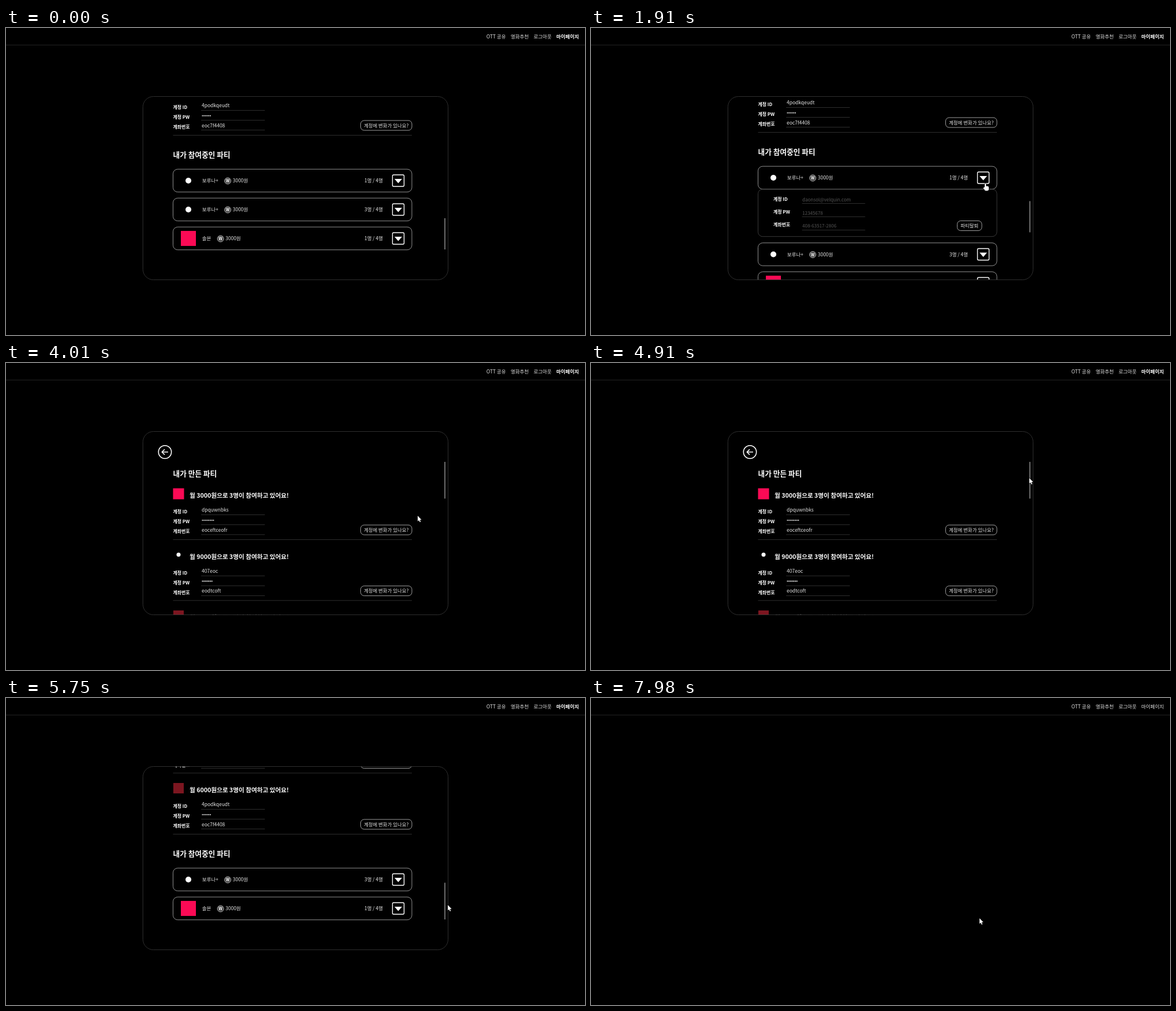
These frames come from a looping animation (1000 px wide and 531 px high, 8 s). An HTML page with a canvas:

```html
<!DOCTYPE html>
<html lang="ko">
<head>
<meta charset="utf-8">
<title>마이페이지</title>
<style>
html, body { margin: 0; width: 100%; height: 100%; overflow: hidden; background: #000; }
canvas { display: block; width: 1000px; height: 531px; }
</style>
</head>
<body>
<canvas id="stage" width="1000" height="531"></canvas>
<script>
const ctx = document.getElementById('stage').getContext('2d');
const FONT = '"Noto Sans CJK KR", "Noto Sans CJK", "Noto Sans", sans-serif';
const WHITE = '#fff', LIGHT = '#e4e4e4', RED = '#fa0a55';
const BODY = 8.45, LABEL = 7.9, TITLE = 10.6, HEADING = 12.65;
const LEFT = 288.5, WIDTH = 412.5, RIGHT = LEFT + WIDTH;
const ROW = 50, ROW_HEIGHT = 39.5, PANEL = 82.5;

const LOOP = 8000;
const OPEN_FIRST = 1860, LEAVE_FIRST = 3290, RELOAD = 3430;
const OPEN_SECOND = 6510, LEAVE_SECOND = 7790;
const DRAG_START = 5010, DRAG_END = 5750, DRAG_RANGE = 281;

const mora = { name: '보루나+', color: WHITE, size: 10, round: true };
const solv = { name: '솔븐', color: RED, size: 26 };
const hosted = [
  { color: RED, size: 19, price: 3000, id: 'dpquwnbks', dots: 8, account: 'eoceftceofr' },
  { color: WHITE, size: 7, round: true, price: 9000, id: '407eoc', dots: 7, account: 'eodtcoft' },
  { color: '#7c1620', size: 18, price: 6000, id: '4podkqeudt', dots: 6, account: 'eoc7f4408' }
];
const joined = [
  { service: mora, members: 1 },
  { service: mora, members: 3 },
  { service: solv, members: 1 }
];

// Where the pointer heads, one stop after another.
const stops = [
  { start: 940, end: 1640, x: 681, y: 269, button: true },
  { start: 1990, end: 2620, x: 655, y: 344, button: true },
  { start: RELOAD, end: 4520, x: 757, y: 199 },
  { start: 5910, end: 6240, x: 679, y: 361, button: true },
  { start: 7150, end: 7370, x: 662, y: 363, button: true },
  { start: LEAVE_SECOND, end: 7980, x: 671, y: 381 }
];

const progress = (t, a, b) => Math.min(1, Math.max(0, (t - a) / (b - a)));
const smooth = p => p * p * (3 - 2 * p);

function dragOffset(t) {
  return DRAG_RANGE * (1 - (1 - progress(t, DRAG_START, DRAG_END)) ** 1.77);
}

function scrollAt(t) {
  if (t < RELOAD) return t < OPEN_FIRST ? 331 : 336;
  return dragOffset(t) + PANEL * smooth(progress(t, 6830, 7150));
}

function pointerAt(t) {
  let x = 745, y = 350;
  for (const stop of stops) {
    if (t < stop.start) break;
    const p = smooth(progress(t, stop.start, stop.end));
    if (stop.start > DRAG_END && stop === stops[3]) { x += 6; y += 159; }
    x += (stop.x - x) * p;
    y += (stop.y - y) * p;
  }
  const drag = t < stops[3].start ? dragOffset(t) / DRAG_RANGE : 0;
  return { x: x + 6 * drag, y: y + 159 * drag };
}

function text(str, x, midY, { size = BODY, bold = false, color = LIGHT, align = 'left' } = {}) {
  ctx.font = `${bold ? 700 : 400} ${size}px ${FONT}`;
  ctx.fillStyle = color;
  ctx.textAlign = align;
  ctx.fillText(str, x, midY + size * 0.37);
}

const strong = (str, x, y, size) => text(str, x, y, { size, bold: true, color: WHITE });

function box(x, y, w, h, r, color, width = 0.8) {
  ctx.beginPath();
  ctx.roundRect(x, y, w, h, r);
  ctx.strokeStyle = color;
  ctx.lineWidth = width;
  ctx.stroke();
}

function rule(x, y, w, color = '#4c4c4c') {
  ctx.fillStyle = color;
  ctx.fillRect(x, y - 0.3, w, 0.6);
}

function disc(x, y, r, color) {
  ctx.beginPath();
  ctx.arc(x, y, r, 0, Math.PI * 2);
  ctx.fillStyle = color;
  ctx.fill();
}

function badge({ color, size, round }, x, y) {
  if (round) return disc(x, y, size / 2, color);
  ctx.fillStyle = color;
  ctx.fillRect(x - size / 2, y - size / 2, size, size);
}

function pill(label, right, y, w) {
  box(right - w, y - 8.5, w, 17, 6, '#c4c4c4');
  text(label, right - w / 2, y, { align: 'center' });
}

function drawNav(active) {
  rule(0, 29.5, 1000, '#3a3a3a');
  let x = 989.4;
  ['마이페이지', '로그아웃', '영화추천', 'OTT 공유'].forEach((label, i) => {
    const bold = active && i === 0;
    text(label, x, 15, { bold, color: bold ? WHITE : LIGHT, align: 'right' });
    x -= ctx.measureText(label).width + 8.4;
  });
}

function drawBackButton(x, y) {
  ctx.beginPath();
  ctx.arc(x, y, 11.2, 0, Math.PI * 2);
  ctx.moveTo(x + 5.5, y);
  ctx.lineTo(x - 5, y);
  ctx.moveTo(x - 0.5, y - 4.6);
  ctx.lineTo(x - 5.2, y);
  ctx.lineTo(x - 0.5, y + 4.6);
  ctx.strokeStyle = WHITE;
  ctx.lineWidth = 1.5;
  ctx.stroke();
}

function drawHosted(party, y) {
  badge(party, 298, y - 3);
  strong(`월 ${party.price}원으로 3명이 참여하고 있어요!`, 317, y, TITLE);
  ['계정 ID', '계정 PW', '계좌번호'].forEach((label, i) => {
    strong(label, LEFT, y + 28 + i * 17, LABEL);
    rule(337, y + 33.5 + i * 17.1, 110);
  });
  text(party.id, 338, y + 25);
  for (let i = 0; i < party.dots; i++) disc(339.4 + i * 2.7, y + 42.8, 1.05, LIGHT);
  text(party.account, 338, y + 59.5);
  pill('계정에 변화가 있나요?', RIGHT, y + 59.5, 88.5);
  rule(LEFT, y + 76.3, WIDTH);
}

function drawJoined({ service, members }, top) {
  const mid = top + ROW_HEIGHT / 2;
  box(LEFT, top, WIDTH, ROW_HEIGHT, 8, '#b4b4b4');
  badge(service, 315, mid);
  text(service.name, 338.7, mid);
  const coin = 355 + ctx.measureText(service.name).width;
  disc(coin, mid + 0.5, 5.5, '#444');
  ctx.strokeStyle = '#ccc';
  ctx.lineWidth = 0.8;
  ctx.stroke();
  text('W', coin, mid + 0.5, { size: 7, bold: true, color: WHITE, align: 'center' });
  text('3000원', coin + 8.6, mid);
  text(`${members}명 / 4명`, 619, mid);
  drawDropdown(677.5, mid);
}

function drawDropdown(x, y) {
  box(x - 10, y - 10, 20, 20, 2, WHITE, 1.4);
  ctx.beginPath();
  ctx.moveTo(x - 6.5, y - 3);
  ctx.lineTo(x + 6.5, y - 3);
  ctx.lineTo(x, y + 4.5);
  ctx.fillStyle = WHITE;
  ctx.fill();
}

function drawDetails(top) {
  box(LEFT, top, WIDTH, PANEL - 0.5, 8, '#484848');
  const fields = { '계정 ID': 'daonsol@velquin.com', '계정 PW': '12345678', '계좌번호': '408-63517-2806' };
  Object.entries(fields).forEach(([label, value], i) => {
    strong(label, 315, top + 17.5 + i * 21.8, LABEL);
    text(value, 365, top + 18.5 + i * 22.6, { size: 8, color: '#555' });
    rule(364.5, top + 25 + i * 22.8, 109);
  });
  pill('파티탈퇴', 675, top + 63.3, 42.5);
}

function drawCard(t) {
  const scroll = scrollAt(t);
  const first = t < RELOAD;
  const rows = first ? joined : joined.slice(1);
  const open = first ? (t >= OPEN_FIRST ? 0 : -1) : (t >= OPEN_SECOND ? 1 : -1);

  ctx.save();
  ctx.beginPath();
  ctx.roundRect(236.5, 118.5, 527, 317, 18);
  ctx.clip();
  ctx.translate(0, -scroll);
  drawBackButton(274.5, 154);
  strong('내가 만든 파티', LEFT, 191, HEADING);
  hosted.forEach((party, i) => drawHosted(party, 229.2 + i * 105.4));
  strong('내가 참여중인 파티', LEFT, 550.2, HEADING);
  rows.forEach((row, i) => {
    const top = 575.2 + i * ROW + (open >= 0 && i > open ? PANEL : 0);
    drawJoined(row, top);
    if (i === open) drawDetails(top + ROW_HEIGHT);
  });
  ctx.restore();

  box(236.5, 118.5, 527, 317, 18, '#3a3a3a');
  const range = DRAG_RANGE + (first ? ROW : 0) + (open >= 0 ? PANEL : 0);
  const thumb = first ? 54 : 63.5;
  ctx.fillStyle = '#858585';
  ctx.fillRect(757.2, 171 + (212 - thumb) * scroll / range, 1.6, thumb);
}

function arrowPath() {
  const path = new Path2D('M0 0V9.5L2.2 7.6 3.7 11 5.2 10.3 3.8 7 6.6 6.8Z');
  return path;
}

function handPath() {
  const path = new Path2D();
  path.roundRect(-1, 0, 2.3, 9, 1);
  path.roundRect(-1.6, 4.6, 7.6, 7.8, 2.4);
  path.roundRect(-3.3, 6.4, 4.5, 3.4, 1.5);
  return path;
}

function drawPointer(t) {
  if (t < stops[0].start) return;
  const { x, y } = pointerAt(t);
  const hovering = stops.some(s => s.button && t > s.start && Math.hypot(s.x - x, s.y - y) < 9);
  const path = hovering ? handPath() : arrowPath();
  ctx.save();
  ctx.translate(x, y);
  ctx.lineJoin = 'round';
  ctx.lineWidth = 1.2;
  ctx.strokeStyle = '#000';
  ctx.stroke(path);
  ctx.fillStyle = WHITE;
  ctx.fill(path);
  ctx.restore();
}

function draw(t) {
  const blank = (t >= LEAVE_FIRST && t < RELOAD) || t >= LEAVE_SECOND;
  ctx.fillStyle = '#000';
  ctx.fillRect(0, 0, 1000, 531);
  drawNav(!blank);
  if (!blank) drawCard(t);
  drawPointer(t);
}

const start = performance.now();
function tick() {
  draw((performance.now() - start) % LOOP);
  requestAnimationFrame(tick);
}
tick();
</script>
</body>
</html>
```
